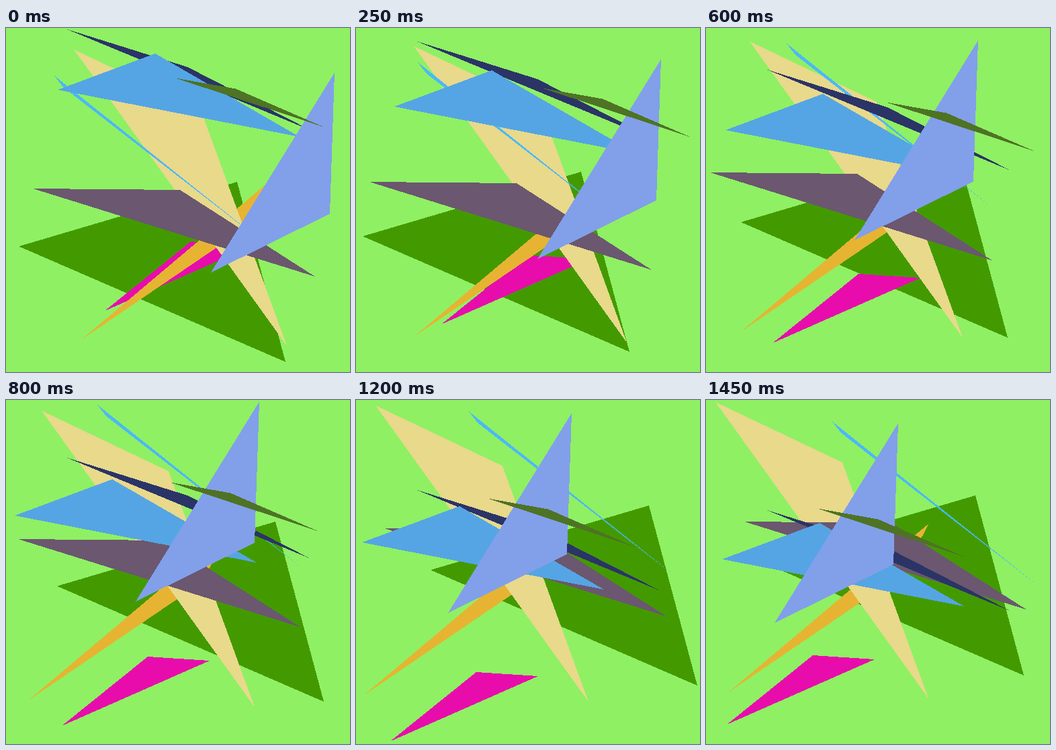
These frames come from a looping animation (512 by 512 pixels, 1.5 s). An HTML page:

```html
<!DOCTYPE html>
<html lang="en">
<head>
<meta charset="utf-8">
<title>Bouncing triangles</title>
<style>
  html, body { margin: 0; width: 100%; height: 100%; overflow: hidden; background: #8ff063; }
  svg { display: block; width: 100vw; height: 100vh; }
</style>
</head>
<body>
<svg id="stage" viewBox="0 0 512 512" shape-rendering="crispEdges"></svg>
<script>
const STEP = 50, STEPS = 30;

// Back to front. vx and vy alternate: speed, step of the bounce, next speed, ...
const shapes = [
  { fill: "#439a00", at: "19,325 344,229 416,497", vx: [-7, 3, 6, 23, -7], vy: [-3] },
  { fill: "#e80cac", at: "147,421 275,318 367,324", vx: [-4], vy: [4, 23, -5] },
  { fill: "#e6b432", at: "112,464 410,213 372,287", vx: [-5, 22, 4.5], vy: [-1] },
  { fill: "#e8d98b", at: "101,32 290,122 418,473", vx: [-3], vy: [-1] },
  { fill: "#4cb8fb", at: "72,71 85,88 375,313", vx: [4], vy: [-4, 18, 3] },
  { fill: "#6b576f", at: "40,239 259,241 460,370", vx: [-4, 10, 3], vy: [-2] },
  { fill: "#2b3467", at: "91,2 270,58 453,152", vx: [0], vy: [-6, 1, 6] },
  { fill: "#55a5e4", at: "77,92 222,38 437,162", vx: [-4, 20, 3], vy: [5] },
  { fill: "#829fea", at: "489,66.5 482,276.5 305,364", vx: [-7], vy: [-4, 17, 3] },
  { fill: "#4e7325", at: "252,74.5 342,90.5 472,147", vx: [5, 8, -6], vy: [3] }
];

const stage = document.getElementById("stage");
for (const s of shapes) {
  s.el = document.createElementNS("http://www.w3.org/2000/svg", "polygon");
  s.el.setAttribute("points", s.at);
  s.el.setAttribute("fill", s.fill);
  stage.append(s.el);
}

function travel(legs, n) {
  let sum = 0, from = 0;
  for (let i = 0; i < legs.length && from < n; i += 2) {
    const to = Math.min(n, legs[i + 1] ?? n);
    sum += legs[i] * (to - from);
    from = to;
  }
  return sum;
}

function draw(ms) {
  const n = Math.floor(ms / STEP) % STEPS;
  for (const s of shapes) {
    s.el.setAttribute("transform", `translate(${travel(s.vx, n)} ${travel(s.vy, n)})`);
  }
}

const start = performance.now();
function tick() {
  draw(performance.now() - start);
  requestAnimationFrame(tick);
}
tick();
</script>
</body>
</html>
```
